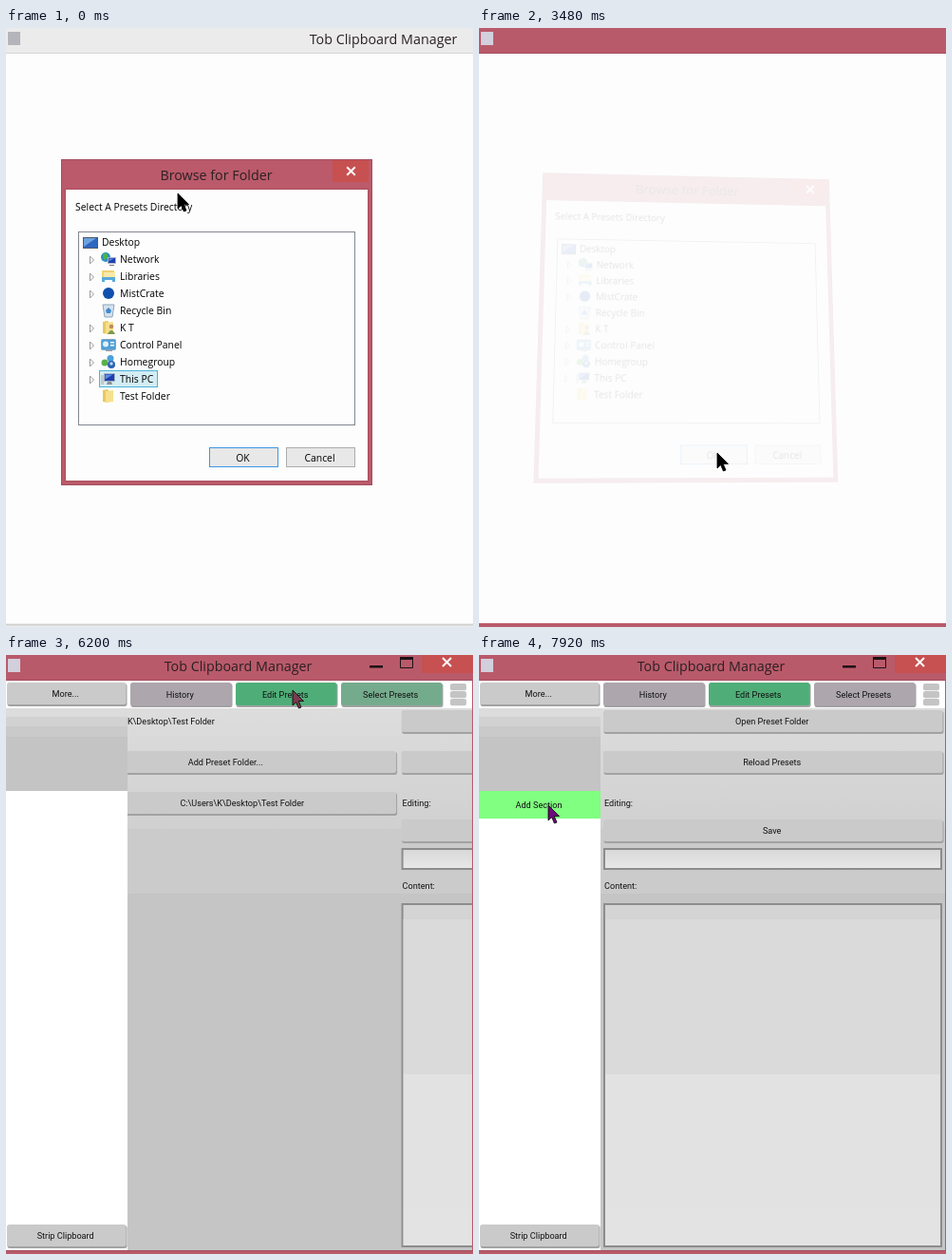
An HTML page that plays this animation: 492 px wide and 630 px high, repeating every 8000 ms.

```html
<!DOCTYPE html>
<html lang="en">
<head>
<meta charset="utf-8">
<title>Clipboard manager</title>
<style>
  html, body { margin: 0; width: 100%; height: 100%; overflow: hidden; background: #fdfdfd; }
  #stage { position: fixed; inset: 0; overflow: hidden; overflow: clip; contain: strict; }
  svg { position: absolute; left: 0; top: 0; width: 492px; height: 630px; overflow: hidden; }
  #dialog { transform-origin: 222px 309.5px; }
  .ui { font: 9.15px Roboto, sans-serif; fill: #111; }
  .win { font: 10.4px "Open Sans", sans-serif; fill: #000; }
  .title { font: 14.3px "Open Sans", sans-serif; fill: #2b2024; }
  .mid { text-anchor: middle; }
</style>
</head>
<body>
<div id="stage">
<svg id="base" viewBox="0 0 492 630"></svg>
<svg id="dialog" viewBox="0 0 492 630"></svg>
<svg id="top" viewBox="0 0 492 630"></svg>
</div>
<script>
const LOOP = 8000, PAGE = 363;
const RED = '#b95a6a', GREEN = [79, 174, 120], GREY = [173, 167, 173];
const APP = 'Tob Clipboard Manager';
const PATH = 'C:\\Users\\K\\Desktop\\Test Folder';
const $ = id => document.getElementById(id);
const clamp = (v, a, b) => Math.min(b, Math.max(a, v));

// Markup helpers
const rect = (x, y, w, h, fill, more = '') =>
  `<rect x="${x}" y="${y}" width="${w}" height="${h}" fill="${fill}" ${more}/>`;
const text = (x, y, s, cls = 'ui', more = '') =>
  `<text x="${x}" y="${y}" class="${cls}" ${more}>${s}</text>`;
const path = (d, fill, more = '') => `<path d="${d}" fill="${fill}" ${more}/>`;
const disc = (x, y, r, fill) => `<circle cx="${x}" cy="${y}" r="${r}" fill="${fill}"/>`;
const group = (id, body, more = '') => `<g id="${id}" ${more}>${body}</g>`;
const button = (x, y, w, h, label, fill = '#cacaca', id = '') =>
  rect(x + .5, y + 1, w, h, '#a2a2a2', 'rx="2.5"') +
  rect(x, y, w - .5, h - 1, fill, `rx="2.5" ${id && `id="${id}"`}`) +
  text(x + w / 2 - 1.3, y + h / 2 + 3, label, 'ui mid');
const cross = (x, y, r, w) =>
  path(`M${x - r} ${y - r}l${2 * r} ${2 * r}M${x + r} ${y - r}l${-2 * r} ${2 * r}`, 'none',
    `stroke="#fff" stroke-width="${w}"`);

// Window before the app is drawn
const waiting =
  rect(0, 0, 492, 630, '#fdfdfd') +
  rect(0, 0, 492, 26, '#ebebeb', 'id="bar"') +
  rect(0, 26, 492, 1, '#d6d6d6', 'id="barLine"') +
  rect(0, 626, 492, 4, '#ebebeb', 'id="foot"') +
  rect(0, 627, 492, 1.5, '#cfcfcf', 'id="footLine"') +
  text(397.5, 17, APP, 'title mid', 'id="idleTitle"');

const selectPage =
  text(132, 73, 'Current: ' + PATH) +
  button(131, 101, 358, 24, 'Add Preset Folder...') +
  button(131, 144, 30, 24, 'X', '#ff7f7f') +
  button(166, 144, 323, 24, PATH);

const field = (y, h, fill) =>
  rect(132, y + 1, 355, h - 2, fill, 'stroke="#8c8c8c" stroke-width="2"');
const editPage =
  button(131, 58, 358, 24, 'Open Preset Folder') +
  button(131, 101, 358, 24, 'Reload Presets') +
  text(132, 159, 'Editing:') +
  button(131, 173, 358, 24, 'Save') +
  field(203, 23, 'url(#line)') +
  text(132, 246, 'Content:') +
  field(261, 362, '#d4d4d4') +
  rect(133, 278, 353, 163, '#dadada') +
  rect(133, 441, 353, 142, '#e2e2e2') +
  rect(133, 583, 353, 38, '#e3e3e3');

const app =
  rect(0, 0, 492, 630, '#fff') +
  rect(0, 0, 492, 27, RED) + rect(0, 26, 492, 1, '#a44e5e') +
  text(244.5, 17, APP, 'title mid') +
  rect(383, 11, 14, 2.5, '#1d1216') +
  path('M415.5 3.5H428.5V13.5H415.5Z', 'none', 'stroke="#1d1216"') + rect(415, 2, 14, 3, '#1d1216') +
  rect(438, 0, 54, 19, '#c75050') + cross(464.5, 7.5, 4.5, 2) +
  button(1, 29, 126, 24, 'More...') +
  button(131, 29, 107, 25, 'History', '#ada7ad') +
  button(242, 29, 107, 25, 'Edit Presets', '#ada7ad', 'editTab') +
  button(353, 29, 107, 25, 'Select Presets', '#ada7ad', 'selectTab') +
  [30, 38, 46].map(y => rect(468, y, 17, 7.3, '#c4c4c4', 'rx="2"')).join('') +
  rect(0, 56, 128, 9, '#dcdcdc') + rect(0, 65, 128, 10, '#d2d2d2') +
  rect(0, 75, 128, 11, '#cacaca') + rect(0, 86, 128, 57, '#c4c4c4') +
  group('section', rect(0, 143, 128, 29, '#80ff80') + text(63, 161, 'Add Section', 'ui mid')) +
  button(1, 599, 126, 24, 'Strip Clipboard') +
  rect(128, 56, 363, 127, 'url(#back)') +
  rect(128, 183, 363, 68, '#cbcbcb') + rect(128, 251, 363, 375, '#c5c5c5') +
  `<g clip-path="url(#view)">${group('selectPage', selectPage)}${group('editPage', editPage)}</g>` +
  rect(491, 27, 1, 600, RED) +
  rect(0, 626, 492, 4, RED) + rect(0, 626, 492, 1, '#a44e5e');

const ramp = (id, a, b) =>
  `<linearGradient id="${id}" x2="0" y2="1"><stop stop-color="${a}"/><stop offset="1" stop-color="${b}"/></linearGradient>`;

$('base').innerHTML =
  `<defs>${ramp('back', '#dddddd', '#d0d0d0')}${ramp('line', '#d8d8d8', '#e8e8e8')}
   <clipPath id="view"><rect x="128" y="56" width="363" height="570"/></clipPath></defs>` +
  group('waiting', waiting) + group('app', app) +
  rect(2, 4, 13, 14, '#d3cfdc', 'id="appMark"');

// Tree icons, drawn in a 16 by 16 box
const folder = path('M2 2l5-1 1 1v13l-6-1z', '#e9c95c') + path('M5 3l8-1v12l-8 1z', '#f7e08c');
const screen = (x, y, w, h) =>
  rect(x, y, w, h, '#1d3fae', 'stroke="#a9b4c4"') + path(`M${x + 1} ${y + 1}h${w - 3}l-${w - 3} ${h - 3}z`, '#5c8fe6');
const icons = {
  desktop: rect(.5, 2.5, 15, 11, '#2f66c0', 'stroke="#4d5a66"') + path('M1 3h13L1 12z', '#6ba2e0'),
  network: disc(5, 6, 5, '#2a8fc4') + path('M2 3q4-3 5 1t-4 5z', '#4bb54a') + screen(7.5, 6.5, 8, 6) + rect(9, 14, 5, 1, '#777'),
  libraries: rect(1, 2, 13, 9, '#f0d375') + rect(3, 4, 12, 7, '#faeaa8') + path('M1 9h14v5h-3v-2H4v2H1z', '#58a9dc'),
  drive: disc(8, 8, 6, '#0f4fae'),
  bin: path('M2 2h12l-2 13H4z', '#d5e2ee', 'stroke="#8fa5b8"') + path('M5 8l3-3 3 3-1 3H6z', '#3f88d0'),
  user: folder + disc(11, 7, 2.3, '#b98e5e') + path('M7 15q4-8 8 0z', '#7d9a4c'),
  panel: rect(.5, 2.5, 15, 11, '#4f9fd8', 'rx="1" stroke="#85a7bd"') + disc(5, 7.5, 3, '#dff1fb') +
    rect(10, 5, 4, 1.5, '#fff') + rect(10, 8, 4, 1.5, '#fff') + rect(5, 14, 7, 1, '#99a'),
  home: disc(10, 4.5, 3.5, '#4aa0d8') + disc(4, 9, 3.5, '#5bb04c') + disc(11, 11, 4, '#2b62b0') + disc(11, 10, 1.7, '#b9daf3'),
  pc: rect(0, 4, 3, 10, '#c2c8ce') + screen(3.5, 2.5, 11, 8) + path('M6 14l1-3h4l1 3z', '#8a9299'),
  folder
};
const rows = [
  ['network', 'Network', 1], ['libraries', 'Libraries', 1], ['drive', 'MistCrate', 1],
  ['bin', 'Recycle Bin', 0], ['user', 'K T', 1], ['panel', 'Control Panel', 1],
  ['home', 'Homegroup', 1], ['pc', 'This PC', 1], ['folder', 'Test Folder', 0]
];
const row = ([icon, label, opens], i) => {
  const y = 243 + 18 * i;
  return (opens ? path(`M88.5 ${y - 3}v8l4-4z`, '#fff', 'stroke="#9a9a9a"') : '') +
    `<g transform="translate(100 ${y - 8})">${icons[icon]}</g>` + text(120, y + 4, label, 'win');
};
const mark = (id, y, w) =>
  rect(98.5, y + .5, w, 17, '#d3edf3', `id="${id}" stroke="#4bb3d8"`);

$('dialog').innerHTML =
  rect(58.5, 138.5, 327, 342, '#bb5a6a', 'stroke="#a34d5c"') +
  rect(62.5, 169.5, 319, 307, '#fdfdfd', 'stroke="#a9505f"') +
  text(221.5, 160, 'Browse for Folder', 'title mid') +
  rect(344, 139, 38, 23, '#c75050') + cross(363.5, 150.5, 4.3, 2) +
  text(73, 192, 'Select A Presets Directory', 'win') +
  rect(76.5, 214.5, 291, 203, '#fdfdfd', 'stroke="#828790"') +
  mark('pcMark', 360, 61) + mark('testMark', 378, 79) +
  `<g transform="translate(81 218)">${icons.desktop}</g>` + text(101, 229, 'Desktop', 'win') +
  rows.map(row).join('') +
  rect(214.5, 441.5, 72, 20, '#e8e8e8', 'id="ok" stroke="#3d97e6"') + text(249.5, 456, 'OK', 'win mid') +
  rect(295.5, 441.5, 72, 20, '#e8e8e8', 'stroke="#acacac"') + text(330.5, 456, 'Cancel', 'win mid');

$('top').innerHTML = path('M0 0V16L3.7 12.6 6.4 19 9 18 6.3 11.5H11.5Z', '#000', 'id="cursor" stroke="#000" stroke-width=".8"');

// How many of n evenly spaced steps from a to b have begun
const stepAt = (t, a, b, n) => clamp(Math.floor((t - a) / (b - a) * (n - 1) + .1) + 1, 0, n);

// start, end, steps, control point, end point
const moves = [
  [790, 1580, 10, [179, 209], [142, 360]],
  [1670, 1850, 3, [142, 373], [142, 386]],
  [2580, 3030, 6, [190, 425], [251, 447]],
  [4390, 5110, 9, [205, 290], [291, 151]],
  [5380, 5840, 6, [294, 95], [302, 37]],
  [7110, 7650, 7, [160, 190], [73, 158]]
];
function cursorAt(t) {
  let pos = [181, 174];
  for (const [a, b, n, c, end] of moves) {
    if (t < a - 5) break;
    const p = stepAt(t, a, b, n) / n, q = 1 - p;
    pos = pos.map((v, i) => q * q * v + 2 * p * q * c[i] + p * p * end[i]);
  }
  return pos;
}

const set = (id, name, value) => $(id).setAttribute(name, value);
const show = (id, on) => set(id, 'visibility', on ? 'visible' : 'hidden');
const mix = (a, b, p) => `rgb(${a.map((v, i) => Math.round(v + (b[i] - v) * p))})`;

function draw(t) {
  const closing = stepAt(t, 3230, 3680, 7);
  const active = closing > 1, ready = closing > 5;
  show('waiting', !ready);
  set('app', 'display', ready ? 'inline' : 'none');
  set('bar', 'fill', active ? RED : '#ebebeb');
  set('foot', 'fill', active ? RED : '#ebebeb');
  set('barLine', 'fill', active ? '#a44e5e' : '#d6d6d6');
  set('footLine', 'fill', active ? RED : '#cfcfcf');
  set('idleTitle', 'display', active ? 'none' : 'inline');
  set('appMark', 'fill', active ? '#d3cfdc' : '#b4b4bb');

  // Dialog: choice, hover, then tilt away and fade
  show('pcMark', t < 2030);
  show('testMark', t >= 2030 && !active);
  set('ok', 'fill', closing === 1 ? '#c9e0f7' : t >= 2940 && !active ? '#dfeefb' : '#e8e8e8');
  const tilt = clamp((closing - 1) / 3, 0, 1), box = $('dialog').style;
  box.display = closing > 4 ? 'none' : 'block';
  box.opacity = [1, 1, .7, .35, .1, 0, 0, 0][closing];
  box.transform = tilt
    ? `translate(${-2 * tilt}px, ${2.5 * tilt}px) perspective(800px) rotateX(${8.7 * tilt}deg) rotateY(${3.9 * tilt}deg) scale(${1 - .05 * tilt})`
    : 'none';

  // Tabs and page slide
  const k = stepAt(t, 6110, 6650, 7);
  const slide = clamp((k - 1) * 90 / 422, 0, 1);
  set('selectPage', 'transform', `translate(${-PAGE * slide} 0)`);
  set('editPage', 'transform', `translate(${PAGE * (1 - slide)} 0)`);
  set('selectTab', 'fill', mix(GREEN, GREY, Math.min(1, k / 5)));
  set('editTab', 'fill', mix(GREY, GREEN, Math.min(1, k / 2)));
  set('section', 'display', k > 5 ? 'inline' : 'none');

  const [x, y] = cursorAt(t);
  set('cursor', 'transform', `translate(${x.toFixed(1)} ${y.toFixed(1)})`);
  set('cursor', 'fill', t >= 7650 ? '#6b0a78' : t >= 5840 && t < 7110 ? '#7d3a50' : ready && t < 5380 ? '#333' : '#000');
}

const start = performance.now();
function tick() {
  draw((performance.now() - start) % LOOP);
  requestAnimationFrame(tick);
}
tick();
</script>
</body>
</html>
```
